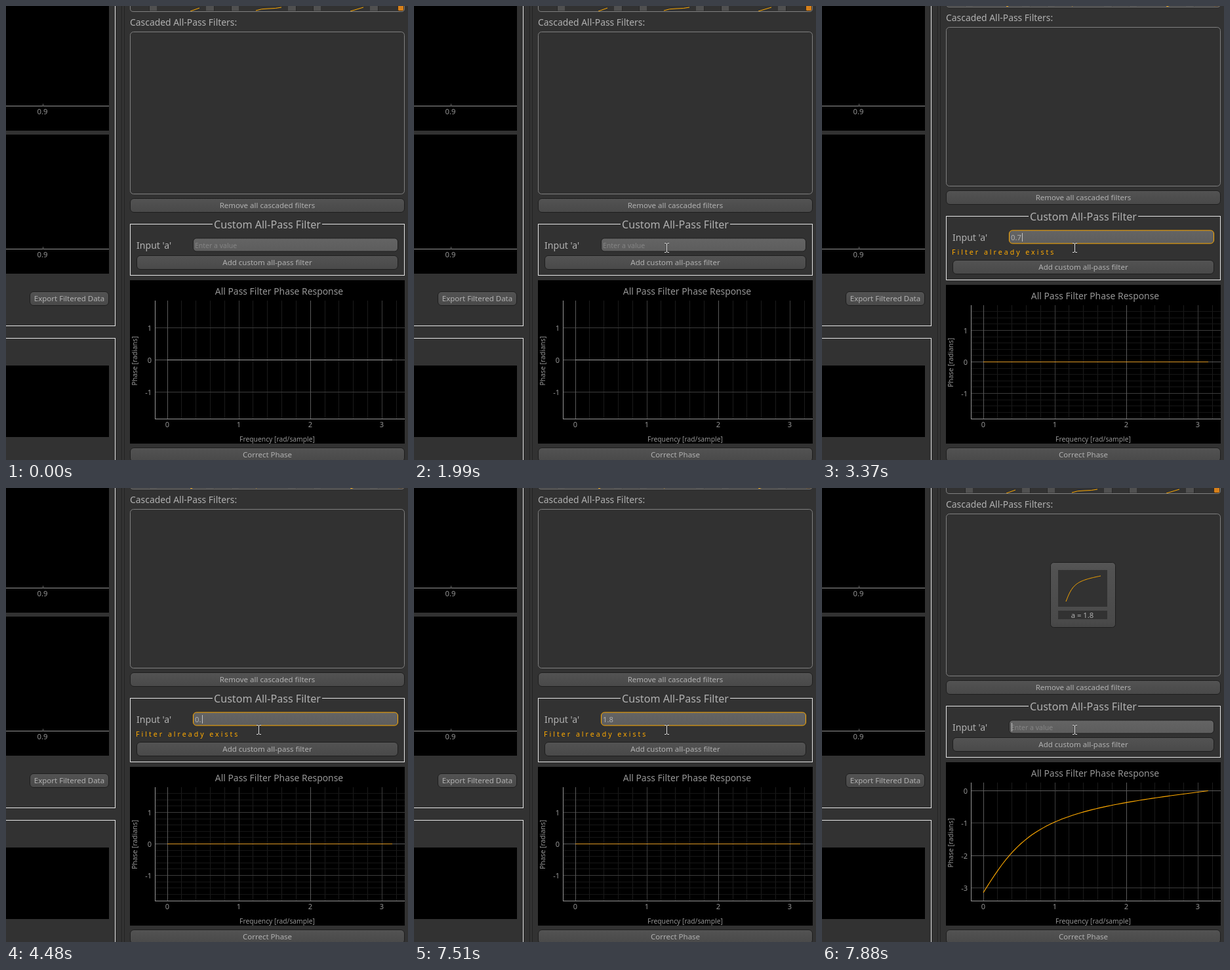
An HTML page that plays this animation: 613 px wide and 692 px high, repeating every 8 s.

```html
<!DOCTYPE html>
<html lang="en">
<head>
<meta charset="utf-8">
<title>All-pass filter panel</title>
<style>
  html, body { margin: 0; width: 100%; height: 100%; overflow: hidden; background: #323232; }
  svg { display: block; width: 100%; height: 100%; }
  text { font-family: "Noto Sans", "Open Sans", sans-serif; fill: #b1b1b1; white-space: pre; }
  .axis text { fill: #969696; }
  .crisp { shape-rendering: crispEdges; }
</style>
</head>
<body>
<svg viewBox="0 0 613 692" xmlns="http://www.w3.org/2000/svg">
  <defs>
    <linearGradient id="btn" x2="0" y2="1">
      <stop offset="0" stop-color="#565656"/><stop offset=".1" stop-color="#525252"/>
      <stop offset=".5" stop-color="#4e4e4e"/><stop offset=".9" stop-color="#4a4a4a"/>
      <stop offset="1" stop-color="#464646"/>
    </linearGradient>
    <linearGradient id="field" x2="0" y2="1">
      <stop offset="0" stop-color="#646464"/><stop offset="1" stop-color="#5d5d5d"/>
    </linearGradient>
  </defs>
  <rect width="613" height="692" fill="#323232"/>
  <g id="left"></g>
  <g id="panel"></g>
  <g id="pointer"></g>
</svg>
<script>
const LOOP = 8000;
const ORANGE = '#ffaa00';
const byId = id => document.getElementById(id);

const rect = (x, y, w, h, fill, more = '') =>
  `<rect x="${x}" y="${y}" width="${w}" height="${h}" fill="${fill}" ${more}/>`;
const path = (d, stroke, more = '') =>
  `<path d="${d}" fill="none" stroke="${stroke}" ${more}/>`;
const hLine = (x1, x2, y, c) => path(`M${x1} ${y}H${x2}`, c, 'class="crisp"');
const vLine = (x, y1, y2, c) => path(`M${x} ${y1}V${y2}`, c, 'class="crisp"');
const text = (x, y, size, str, more = '') =>
  `<text x="${x}" y="${y}" font-size="${size}" ${more}>${str}</text>`;
const middle = 'text-anchor="middle"';
const snap = v => Math.floor(v) + 0.5;

function button(x, y, w, h, label, hover) {
  const edge = hover ? 'stroke="#f0952a" stroke-width="2"' : 'stroke="#1e1e1e"';
  return rect(x + .5, y + .5, w - 1, h - 1, 'url(#btn)', `rx="5.5" ${edge}`) +
    text(x + w / 2, y + h / 2 + 4.2, 11.5, label, middle);
}

function drawLeft() {
  const plot = (y, h, axisY) => rect(0, y, 157, h, '#000') +
    hLine(0, 157, axisY, '#969696') + vLine(56.5, axisY - 4, axisY, '#6a6a6a') +
    text(55.5, axisY + 12.5, 11.3, '0.9', `${middle} style="fill:#969696"`);
  return plot(0, 190, 152.5) + plot(196, 212, 370.5) +
    button(36, 435, 121, 22, 'Export Filtered Data') +
    path('M166.5 0V487.5H0M0 506.5H166.5V692', '#e6e6e6', 'class="crisp"') +
    rect(0, 548, 157, 109, '#000') +
    rect(176.5, -1, 4, 694, '#343434', 'stroke="#232323" class="crisp"');
}

// Phase of a first-order all-pass section, pole at 1/a.
function phase(w, a = 1.8) {
  const r = 1 / a;
  return -Math.PI + w + 2 * Math.atan(r * Math.sin(w) / (1 - r * Math.cos(w)));
}

function phasePath(x0, xUnit, y0, yUnit) {
  let d = '';
  for (let i = 0; i <= 60; i++) {
    const w = Math.PI * i / 60;
    d += `${i ? 'L' : 'M'}${(x0 + w * xUnit).toFixed(2)} ${(y0 - phase(w) * yUnit).toFixed(2)}`;
  }
  return d;
}

// Lower edge of the filter gallery, mostly scrolled out of view.
function galleryEdge() {
  const curves = ['M281 8L295 3', 'M381 7Q389 4 400 4T420 2', 'M525 8L545 2'];
  return [218, 343, 468].map(x =>
      rect(x + .5, -20, 99, 28, '#505050', 'stroke="#262626"') + rect(x + 12, -20, 75, 28, '#323232')).join('') +
    curves.map(d => path(d, ORANGE)).join('') +
    rect(597.5, -10, 9, 17.5, '#d7801a', 'rx="2" stroke="#3a2a18"') +
    path('M189.5 -20V4Q189.5 8.5 194 8.5H603Q607.5 8.5 607.5 4V-20', '#808080');
}

function filterTile() {
  return rect(348.5, 113.5, 99, 99, 'url(#btn)', 'rx="5" stroke="#1e1e1e"') +
    rect(360, 125, 75, 56, '#323232') + rect(360, 187, 75, 13, '#323232') +
    path(phasePath(372, 53 / Math.PI, 134, 39 / Math.PI), ORANGE) +
    text(397, 198, 11.3, 'a = 1.8', middle);
}

function plot(s) {
  const top = s.warn ? 425 : 418;
  const areaTop = top + 31;
  const unit = s.warn ? 48 : 49.4;
  const zero = s.warn ? 542.5 : s.added ? 461.5 : 539.5;
  const xUnit = 109.1;
  const ticks = s.added ? [0, -1, -2, -3] : [1, 0, -1];
  const shade = n => n % 10 === 0 ? '#5a5a5a' : n % 5 === 0 ? '#3c3c3c' : '#1b1b1b';
  let out = rect(189, top, 419, 667 - top, '#000');

  for (let n = 1; n <= 16; n++)
    if (n % 5) out += vLine(snap(246 + n * xUnit / 5), areaTop, 629, shade(n));
  if (s.warn) {
    for (let n = -8; n <= 8; n++)
      if (n % 5) out += hLine(228, 608, snap(zero - n * unit / 5), '#161616');
  }
  for (const v of ticks) {
    const y = snap(zero - v * unit);
    out += hLine(228, 608, y, shade(v * 5)) +
      text(222, y + 4.5, 11, v, 'text-anchor="end"');
  }
  for (let v = 0; v <= 3; v++) {
    const x = snap(246 + v * xUnit);
    out += vLine(x, areaTop, 629, shade(v * 5)) + text(x - .5, 642, 11, v, middle);
  }
  out += path(`M227.5 ${areaTop}V629.5H608`, '#969696', 'class="crisp"');
  out += s.added ? path(phasePath(246, xUnit, zero, unit), ORANGE, 'stroke-width="1.1"')
                 : hLine(246, 589, zero, s.warn ? '#e09a24' : '#a0a0a0');

  const labelY = s.warn ? 543.5 : 541;
  out += text(416.5, top + 22, 13.9, 'All Pass Filter Phase Response', middle) +
    text(413.5, 664, 10.3, 'Frequency [rad/sample]', middle) +
    text(0, 0, 10.4, 'Phase [radians]', `${middle} transform="translate(200 ${labelY}) rotate(-90)"`);
  return `<g class="axis">${out}</g>`;
}

function customGroup(s) {
  const top = s.warn ? 320.5 : 332.5;
  const bottom = s.warn ? 417.5 : 410.5;
  const fieldY = top + 22;
  let out = path(`M315 ${top}H189.5V${bottom}H607.5V${top}H482`, '#e6e6e6', 'class="crisp"') +
    text(398.5, top + 6.5, 16.1, 'Custom All-Pass Filter', middle) +
    text(199, top + 37.5, 14.1, "Input 'a'") +
    rect(285.5, fieldY - .5, 312, 20, 'url(#field)', `rx="5" stroke="${s.warn ? ORANGE : '#1e1e1e'}"`);
  out += s.typed ? text(288, fieldY + 14.5, 11.3, s.typed)
                 : text(288, fieldY + 14.5, 10.5, 'Enter a value', 'style="fill:#858585"');
  if (s.caret) {
    const x = s.typed ? [295.5, 299.5, 305.5][s.typed.length - 1] : s.warn ? 288.5 : 289.5;
    out += vLine(x, fieldY + 3.5, fieldY + 16.5, '#c4c4c4');
  }
  if (s.warn)
    out += text(198, 379, 10.6, 'Filter already exists', `letter-spacing="3" style="fill:${ORANGE}"`);
  return out + button(199, bottom - 30.5, 399, 22, 'Add custom all-pass filter', s.hover);
}

function drawPanel(s) {
  const lift = s.warn ? -7 : 0;
  const listH = s.warn ? 242 : 247;
  return `<g transform="translate(0 ${lift})">` + galleryEdge() +
    text(189, 30, 13.9, 'Cascaded All-Pass Filters:') +
    rect(189.5, 39.5, 418, listH, '#313131', 'rx="5" stroke="#808080"') + '</g>' +
    (s.added ? filterTile() : '') +
    button(189, s.warn ? 281 : 293, 419, 22, 'Remove all cascaded filters') +
    customGroup(s) + plot(s) +
    button(189, 673, 419, 22, 'Correct Phase');
}

// Field contents: [start, text, caret shown]
const typing = [
  [0, '', 0], [1490, '', 1], [1990, '', 0],
  [2240, '0', 1], [2520, '0.', 1], [2860, '0.7', 1], [3980, '0.7', 0],
  [4480, '0.', 1], [4730, '0', 1], [4900, '', 1], [5720, '', 0],
  [5840, '1', 1], [6140, '1.', 1], [6770, '1.', 0],
  [6960, '1.8', 1], [7510, '1.8', 0], [7820, '', 0], [7880, '', 1]
];

// Pointer stops: [start, x, y, shape]
const moves = [
  [670, 78, 490, 'arrow'], [730, 228, 492, 'arrow'], [790, 257, 478, 'arrow'],
  [850, 385, 449, 'arrow'], [910, 398, 395, 'arrow'], [970, 392, 378, 'arrow'],
  [1030, 389, 376, 'arrow'], [1090, 387, 372, 'beam'], [1150, 386, 370, 'beam'],
  [1220, 385, 368, 'beam']
];

const latest = (list, t) => list.filter(e => e[0] <= t).pop();

function drawPointer(move) {
  if (!move) return '';
  const [, x, y, shape] = move;
  const at = `transform="translate(${x} ${y})"`;
  if (shape === 'arrow')
    return `<path ${at} d="M.5 .5V16.5L4.2 13L6.7 18.7L9.2 17.6L6.8 12H11.8Z" fill="#fff" stroke="#111" stroke-width=".8"/>`;
  const d = 'M-3 -6.5H-1L.5 -5.5L2 -6.5H4M.5 -5.5V6.5M-3 7.5H-1L.5 6.5L2 7.5H4';
  return `<g ${at}>${path(d, '#222', 'stroke-width="2.4" opacity=".5"')}${path(d, '#e4e4e4')}</g>`;
}

const shown = {};
function put(id, html) {
  if (shown[id] !== html) byId(id).innerHTML = shown[id] = html;
}

function render(t) {
  const [, typed, caret] = latest(typing, t);
  const move = latest(moves, t);
  put('panel', drawPanel({
    typed, caret,
    warn: t >= 3370 && t < 7820,
    added: t >= 7820,
    hover: !!move && move[3] === 'arrow' && move[2] > 380 && move[2] < 402
  }));
  put('pointer', drawPointer(move));
}

put('left', drawLeft());
const start = performance.now();
function tick() {
  render((performance.now() - start) % LOOP);
  requestAnimationFrame(tick);
}
tick();
</script>
</body>
</html>
```
